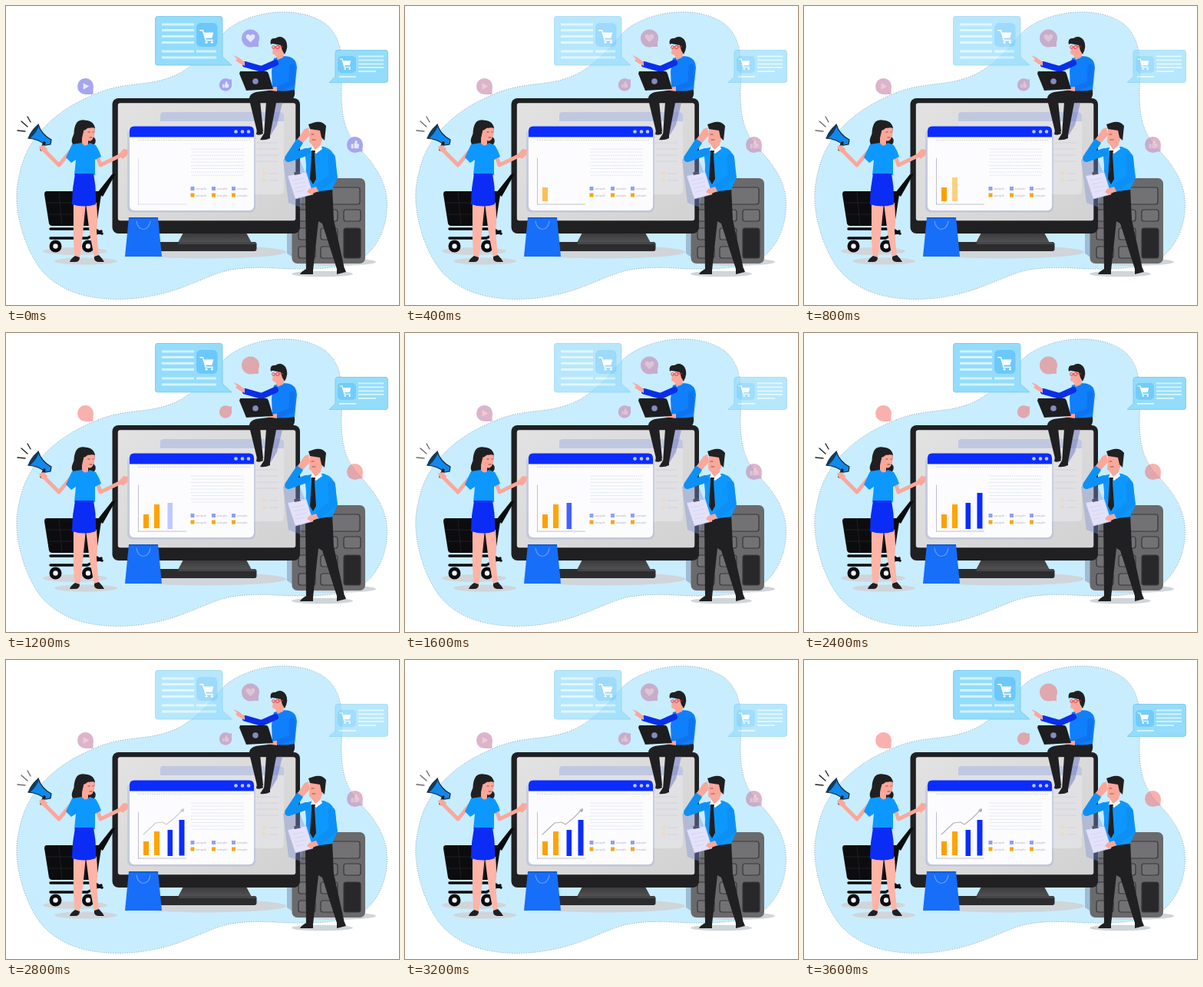
An HTML page that plays this animation: 512 by 389 pixels, repeating every 3800 ms.

```html
<!DOCTYPE html>
<html lang="en">
<head>
<meta charset="utf-8">
<title>Online shop</title>
<style>
  html, body { margin: 0; width: 100%; height: 100%; overflow: hidden; background: #fff; }
  svg { display: block; width: 100vw; height: 100vh; }
  .line { fill: none; stroke-linecap: round; stroke-linejoin: round; }
  .skin { fill: #fba79a; }
  .skin-line { stroke: #fba79a; }
  .black { fill: #202022; }
  .label { font: 4.6px Lato, "Open Sans", sans-serif; fill: #b4b4c2; }
  .glow { opacity: var(--glow); }
  .plain { opacity: var(--purple); }
  .alert { opacity: var(--red); }
  .axes { opacity: var(--axes); }
</style>
</head>
<body>
<svg viewBox="0 0 512 389" preserveAspectRatio="none">
  <defs>
    <linearGradient id="screen" x2="1" y2="1">
      <stop stop-color="#e2e2e2"/><stop offset="1" stop-color="#d2d2d3"/>
    </linearGradient>
    <linearGradient id="stand" x2="0" y2="1">
      <stop stop-color="#3a3a3c"/><stop offset="1" stop-color="#525254"/>
    </linearGradient>
    <g id="cart">
      <path class="line" stroke="#fff" stroke-width="1.6" d="M-10-8h4l4 14h10"/>
      <path fill="#fff" d="M-6-5H9L7 3H-3z"/>
      <circle cx="-1" cy="9" r="1.6" fill="#fff"/><circle cx="7" cy="9" r="1.6" fill="#fff"/>
    </g>
    <path id="thumb" d="M-5-1h3v6h-3zM-1-1 1-6Q4-6 3-1H6L5 5H-1z"/>
    <path id="heart" d="M0 5-5 0Q-7-4-3-5-1-5 0-3 1-5 3-5 7-4 5 0z"/>
    <path id="play" d="M-3-4.5 5 0-3 4.5z"/>
  </defs>

  <!-- backdrop and shadows -->
  <path fill="#c8edff" stroke="#5a6a70" stroke-width=".6" stroke-dasharray="1 2"
    d="M120 113C150 101 175 103 200 97C225 91 238 81 255 66C276 47 280 33 302 22C336 4 387 2 416 23C442 43 438 80 437 112C437 148 443 166 460 185C476 202 490 219 495 243C501 276 488 310 467 326C438 344 400 342 367 342C340 340 310 339 287 344.500C250 354 216 381 145 381.500C100 381 72 369 52 350C27 326 9 268 15 232C21 198 28 184 45 163C68 137 93 124 120 113z"/>
  <g fill="#d0d5d9">
    <ellipse cx="260" cy="320" rx="105" ry="8.5"/>
    <ellipse cx="104" cy="332" rx="41" ry="4.5"/>
    <ellipse cx="90" cy="319" rx="42" ry="5"/>
    <ellipse cx="428" cy="333" rx="54" ry="5"/>
    <ellipse cx="412" cy="348.500" rx="40" ry="3.800"/>
  </g>

  <!-- speech bubbles -->
  <g class="glow">
    <path fill="#94dcfb" stroke="#78c6ea" stroke-width=".8" d="M197 13.500H279Q282 13.500 282 17V66L294 77H197Q194.500 77 194.500 74V17Q194.500 13.500 197 13.500z"/>
    <rect x="248" y="22" width="27.500" height="31" rx="6" fill="#6cc8fb"/>
    <path stroke="#d3f3ff" stroke-width="3" d="M203 24h42M203 31.500h42M203 39.500h42M203 47.500h42M203 59h42M248 59h26M203 67h71"/>
    <path fill="#94dcfb" stroke="#78c6ea" stroke-width=".8" d="M432 57.500H495Q497.500 57.500 497.500 61V97Q497.500 99.500 494 99.500H421L429 92V61Q429 57.500 432 57.500z"/>
    <rect x="432" y="65" width="24" height="22" rx="5" fill="#72ccfb"/>
    <path stroke="#d3f3ff" stroke-width="2" d="M459 65.500h33M459 70.500h33M459 75.500h33M459 80h33M459 85h23M434 92h22"/>
  </g>
  <use href="#cart" transform="translate(262 39) scale(.92)"/>
  <use href="#cart" transform="translate(442.500 75) scale(.75)"/>

  <g id="badges"></g>

  <!-- calculator -->
  <path fill="#8ea9c4" opacity=".7" d="M366 226h12v104l-12-8z"/>
  <rect x="372.500" y="224" width="95.500" height="111" rx="7" fill="#6a6a6c"/>
  <g fill="#727274" stroke="#38383a" stroke-width="1.2">
    <rect x="382" y="236" width="79" height="22" rx="3"/>
    <rect x="381" y="265" width="22" height="15" rx="3"/><rect x="410" y="265" width="22" height="15" rx="3"/><rect x="440" y="265" width="22" height="15" rx="3"/>
    <rect x="381" y="289" width="22" height="15" rx="3"/><rect x="410" y="289" width="22" height="15" rx="3"/>
    <rect x="381" y="313" width="22" height="15" rx="3"/><rect x="410" y="313" width="22" height="15" rx="3"/>
    <rect x="440" y="289" width="22" height="39" rx="3" fill="#28282a"/>
  </g>

  <!-- monitor -->
  <path fill="url(#stand)" d="M231 295h82l7 13h-96z"/>
  <rect x="196" y="307" width="130.500" height="12" rx="3" fill="#2c2c2e"/>
  <path fill="#464648" d="M226 307h96q4 0 4.500 3H224z"/>
  <rect x="138.500" y="120" width="244.500" height="176" rx="8" class="black"/>
  <rect x="145.800" y="126.200" width="231.500" height="153" rx="3" fill="url(#screen)"/>
  <rect x="201" y="138" width="161" height="107" rx="5" fill="#e1e1e4"/>
  <path fill="#c0c8e1" d="M201 150v-8q0-4 4-4h152q4 0 5 4v8z"/>
  <path fill="#e7dcc8" d="M334 215h5v5h-5zM334 224h5v5h-5z"/>
  <path stroke="#d3d3d8" d="M326 178h29M326 186h29M326 194h29M326 202h29M342 218h13M342 227h13"/>

  <!-- front window -->
  <rect x="158" y="160" width="167" height="108.500" rx="7" fill="#9ba5dd" opacity=".35"/>
  <rect x="161" y="156.500" width="162" height="109.500" rx="6" fill="#fcfcff"/>
  <path fill="#0a2cff" d="M161 170.500v-8q0-6 6-6h150q6 0 6 6v8z"/>
  <g fill="#b9c9ff"><circle cx="299.500" cy="163.500" r="2.300"/><circle cx="308" cy="163.500" r="2.300"/><circle cx="316" cy="163.500" r="2.300"/></g>
  <path stroke="#d6d6dc" stroke-dasharray="2 1" d="M172 174.500h146"/>
  <path stroke="#d2d6dc" stroke-width=".8" stroke-dasharray="1.500 1" d="M241 186h70M242 190h68M241 194.500h70M242 199h67M241 203h70M242 211.500h68M241 216h70M242 220h67"/>
  <path stroke="#b9e0ea" stroke-width=".8" stroke-dasharray="1.500 1" d="M241 207.500h70"/>
  <g id="legend"></g>
  <path class="axes line" stroke="#b9bac4" stroke-width=".9" d="M172.500 198v60M172.500 258h62"/>
  <g id="chart">
    <rect x="179" y="236" width="7" height="18" fill="#ffa000"/>
    <rect x="193" y="223" width="7" height="31" fill="#ffa500"/>
    <rect x="210.500" y="221" width="6.500" height="34" fill="#0b2cff"/>
    <rect x="225.500" y="208" width="7" height="46.500" fill="#0b2cff"/>
    <g>
      <path class="line" stroke="#b2b2b6" stroke-width="1.1" d="M179 227 195 212 204 211 209 214 219 206 228 197"/>
      <path fill="#b2b2b6" d="M232 193 231 198 226.500 196z"/><circle cx="230" cy="195.500" r="2" fill="#b2b2b6"/>
    </g>
  </g>

  <!-- shopping cart and bag -->
  <path fill="#0c0c0e" d="M119 243 138 219 143 218 126 248z"/>
  <path fill="#0c0c0e" d="M53 241H123Q125 242 124 246L118 284Q117 286 114 286H60Q57 286 56 283L50 245Q50 241 53 241z"/>
  <path class="line" stroke="#28282b" stroke-width=".7" d="M53 256h68M55 271h65M69 242l4 44M87 242l1 44M105 242l-2 44"/>
  <path class="line" stroke="#0c0c0e" stroke-width="3.500" d="M58 290H115L125 296M58 302H106L124 293"/>
  <g fill="#f4f4f6" stroke="#0c0c0e" stroke-width="4.800"><circle cx="64.500" cy="312.500" r="5.600"/><circle cx="107" cy="312.500" r="5.600"/></g>
  <path fill="#176ef8" d="M160 275H198L203 326H155z"/>
  <path fill="#0d57d4" d="M160 275h38v1.500h-38z"/>
  <path class="line" stroke="#6f9cff" stroke-width="1.200" d="M170 280C172 294 186 294 188 280"/>

  <!-- woman with megaphone -->
  <path fill="#ffb4a6" d="M88 256H104L101 286Q100 300 96 328H90Q87 302 88 286zM104 256H118Q120 280 118 292L121 327H115L109 296z"/>
  <path class="black" d="M90 325 96 327Q96 333 90 333H83Q84 329 90 325zM115 326 121 324Q126 329 128 333H120Q114 332 115 326z"/>
  <path class="line skin-line" stroke-width="5" d="M83 190 69 207 50 188"/>
  <path class="line skin-line" stroke-width="5" d="M119 195 123 207 150 194"/>
  <path class="skin" d="M147 193 153 186 159 187 158 194 152 199z"/>
  <path class="black" d="M102 148.500C91 147 89 157 88.500 166C87 171 84 174 87 180C91 187 99 185 103 181Q110 183 115 180 119 175 114 170 120 149 102 148.500z"/>
  <path class="skin" d="M102 158Q111 160 115 157 117 166 113 173 110 177 107 175V184H99V172z"/>
  <path class="line" stroke="#6b302c" stroke-width=".8" d="M107 164h2M113 164h1M109 171h3"/>
  <path class="black" d="M97 157q8-1 11-7 7 2 8 9-4 0-7-3-4 5-8 6-1 7-6 10z"/>
  <path fill="#0d98ff" d="M86 180 99 178Q103 185 109 178L117 181Q122 189 124 196L116 200 116 220H89L91 200 85 204 78 197z"/>
  <path fill="#0b2cf5" d="M90 218H114Q118 238 117 258Q102 263 86 258 86 238 90 218z"/>
  <path fill="#1188ec" stroke="#172534" stroke-width="1.200" d="M42 154Q46 167 59 174L58 180 51 181Q43 173 29 172z"/>
  <ellipse cx="36" cy="163.500" rx="2.600" ry="11" transform="rotate(36 36 163.500)" fill="#153a58"/>
  <path class="line" stroke="#202024" stroke-width="3.500" d="M50 178 46 187"/>
  <path class="skin" d="M43 183 49 181 54 186 52 191 46 189z"/>
  <path class="glow line" stroke="#222" stroke-width="1.400" d="M28 144 32 151M20 150 28 157M15 162 25 163"/>

  <!-- seated man -->
  <path fill="#7077bf" opacity=".5" d="M347 122h14l-8 33-8 13-5 3z"/>
  <path class="black" d="M375 106Q380 122 365 125L352 126 344 168H336L339 125 331 123 335 163H327L317 122Q316 112 333 111z"/>
  <path class="black" d="M327 161h7l1 5q-5 3-9 1zM336 166h8v6q-6 3-13 2z"/>
  <path fill="#0f7ffb" d="M349 68Q361 64 369 66Q378 68 379 80L376 109Q360 112 347 109L346 85z"/>
  <path class="line" stroke="#0b2fe8" stroke-width="8" d="M351 74 333 82 312 76"/>
  <path class="skin" d="M311 73 303 67 296 64 301 69 299 71 305 75 311 78z"/>
  <path class="skin" d="M348 53 358 49 364 54 361 67 354 70 351 64 347 62z"/>
  <path class="black" d="M345 50Q343 41 351 42Q358 37 364 44Q369 52 363 63L360 58 358 51 347 49z"/>
  <g fill="none" stroke="#d43f56" stroke-width=".9"><circle cx="348.500" cy="53.500" r="1.900"/><circle cx="353.700" cy="53.500" r="2.200"/><path d="M356 53h5"/></g>
  <path class="line" stroke="#0f72ef" stroke-width="7" d="M373 79 372 101 355 107"/>
  <path class="skin" d="M353 105 345 106 339 109 353 111z"/>
  <path fill="#1d1d1f" d="M305 85H339Q341 85 342 88L348 108 313 110 304 88z"/>
  <circle cx="325" cy="98" r="3.800" fill="#858bc0"/>

  <!-- standing man -->
  <path fill="#7c90cf" opacity=".4" d="M378 188 361 200 363 216 368 256 384 262 391 220z"/>
  <path class="black" d="M390 238 425 235 427 278 441 342H431L412 283 407 280 400 344H391z"/>
  <path class="black" d="M391 342h9v7h-17q1-3 8-7zM431 341h10l2 5-12 3z"/>
  <path fill="#0d98ff" d="M389 186 401 183 414 183Q427 187 429 199L432 223 425 239 390 243 391 207z"/>
  <path class="line" stroke="#0d90f6" stroke-width="10" d="M391 190 368 198 382 177"/>
  <path class="skin" d="M380 173 389 160 394 158 396 168 387 178z"/>
  <path class="skin" d="M396 159 411 157 414 170 410 179V187H401L399 181 395 177z"/>
  <path class="black" d="M394 154 400 152Q411 148 417 156L415 175 411 171 409 162 396 160z"/>
  <path class="line" stroke="#833d35" stroke-width=".8" d="M398 167h3M399 174h4"/>
  <path fill="#fff" d="M399 182 403 187 410 181 412 186 404 192 397 188z"/>
  <path class="black" d="M398 188h5l-1 5 2 32-4 7-4-7 2-32z"/>
  <path fill="#e3e2fa" stroke="#c4c5e6" stroke-width=".6" d="M367 221 391 216 400 245 377 251z"/>
  <path class="line" stroke="#d2d2ee" stroke-width=".8" d="M373 227 388 224M375 232 390 229M377 237 391 234M378 242 388 240"/>
  <path fill="#55566a" d="M375 216.500 382 215 384 218.500 376 220z"/>
  <path class="line" stroke="#0d90f6" stroke-width="10" d="M424 197 426 222 406 237"/>
  <path class="skin" d="M404 235 395 238 392 242 397 245 407 241z"/>
</svg>
<script>
  const byId = id => document.getElementById(id);
  const STEP = 200, STEPS = 19;

  // Round badges that blink between purple and plain red.
  const badges = [
    { x: 318.5, y: 42, r: 11.5, glyph: 'heart', tail: [10.5, 11] },
    { x: 286, y: 102.5, r: 8.2, glyph: 'thumb', tail: [8, -7] },
    { x: 103.5, y: 104.5, r: 10.5, glyph: 'play', tail: [10, 10.5] },
    { x: 454.5, y: 180.5, r: 10.5, glyph: 'thumb', tail: [10, 9] }
  ];
  byId('badges').innerHTML = badges.map(({ x, y, r, glyph, tail: [tx, ty] }) => {
    const shape = `<circle r="${r}"/><path d="M${tx} ${ty}L${tx} 0L0 ${ty}z"/>`;
    return `<g transform="translate(${x} ${y})">
      <g class="plain" fill="#a5a6ef">${shape}
        <use href="#${glyph}" fill="#e5e8ff" transform="scale(${r / 11})"/></g>
      <g class="alert" fill="#f5655f">${shape}</g></g>`;
  }).join('');

  byId('legend').innerHTML = [240.5, 268, 294].map(x =>
    [['#8fa0f6', 235], ['#f7a70c', 243.5]].map(([color, y]) =>
      `<rect x="${x}" y="${y}" width="5" height="5" fill="${color}"/>
       <text class="label" x="${x + 6.5}" y="${y + 4}">sample</text>`).join('')).join('');

  // Each chart part fades in from its first to its last step.
  const fades = [[0, 3], [3, 5], [5, 9], [9, 12], [12, 15]];
  const parts = [...byId('chart').children];
  const ramp = (step, [from, to]) => Math.max(0, Math.min(1, (step - from) / (to - from)));
  const root = document.documentElement.style;

  function draw(now) {
    const step = Math.floor(now / STEP) % STEPS;
    const pulse = (1 + Math.cos(step * Math.PI / 3)) / 2;
    const intro = Math.min(1, step / 2);
    root.setProperty('--glow', 0.55 + 0.45 * pulse);
    root.setProperty('--purple', 1 - intro * (0.35 + 0.65 * pulse));
    root.setProperty('--red', intro * (0.2 + 0.3 * pulse));
    root.setProperty('--axes', 0.5 + 0.5 * intro);
    parts.forEach((part, i) => part.style.opacity = ramp(step, fades[i]));
    requestAnimationFrame(draw);
  }
  draw(performance.now());
</script>
</body>
</html>
```
